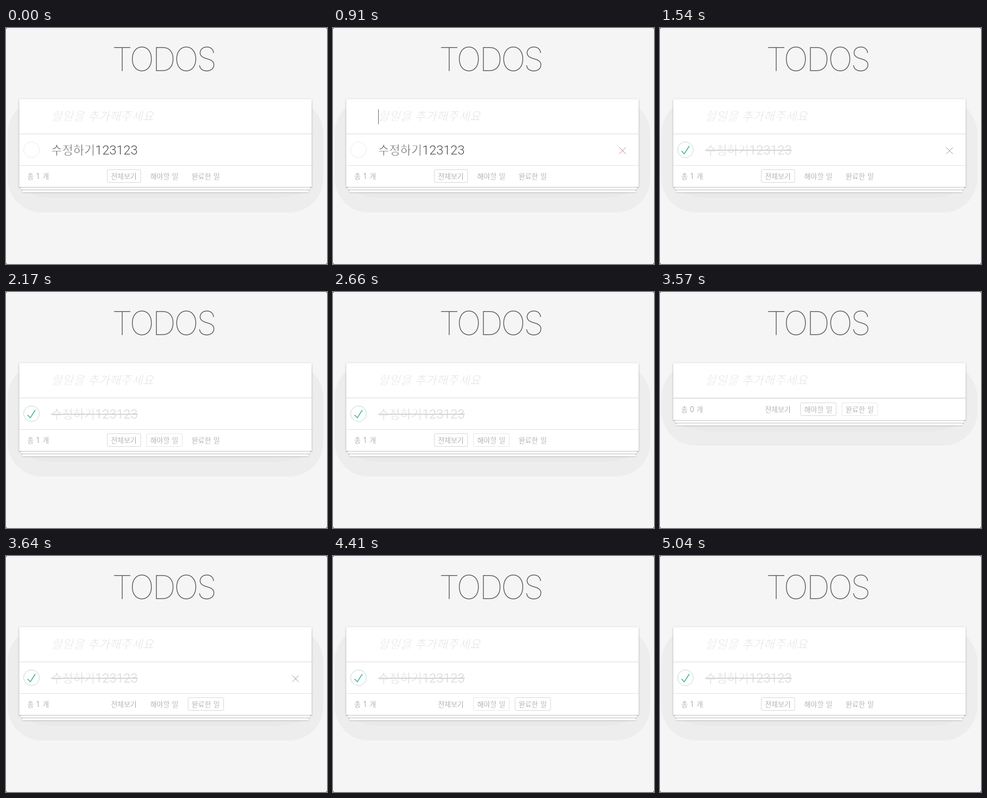
Recreate the animation shown at these times as an HTML page. Size 604 by 444 pixels, loop 6.3 s.

```html
<!DOCTYPE html>
<html lang="ko">
<head>
<meta charset="utf-8">
<title>Todos</title>
<style>
html, body { margin: 0; width: 100%; height: 100%; overflow: hidden; background: #333; }
#stage { position: relative; width: 604px; height: 444px; overflow: hidden; border-radius: 3px; background: #f5f5f5; }
#stage * { position: absolute; }
#card { left: 25px; top: 134px; width: 550px; }
#card div { box-sizing: border-box; }
.glow { inset: 0 -22px -48px; border-radius: 64px; background: #ededed; }
.core { inset: 40px 16px -21px; border-radius: 0 0 60px 60px / 0 0 16px 16px; background: #e9e9e9; }
.paper {
  inset: 0; background: #fff;
  box-shadow: 0 1px 1px rgba(0,0,0,.2),
    0 8px 0 -3px #fcfcfc, 0 9px 1px -3px rgba(0,0,0,.2),
    0 16px 0 -6px #fcfcfc, 0 17px 2px -6px rgba(0,0,0,.2),
    0 1px 4px rgba(0,0,0,.2);
}
.input { left: 0; right: 0; height: 65px; box-shadow: inset 0 -2px 1px rgba(0,0,0,.03); }
svg { left: 0; top: 0; }
/* the white stroke thins the Hangul strokes */
text { font: 300 22.5px "Noto Sans CJK KR", "Noto Sans CJK", sans-serif; white-space: pre; stroke: #fff; stroke-width: .8px; }
.num { font-family: Roboto, sans-serif; font-size: 24px; stroke: none; }
#title { font: 100 62px Inter, sans-serif; letter-spacing: -3.5px; fill: #555; stroke: none; }
#hint { font-style: italic; fill: #dedede; }
#foot text { font-size: 13.16px; word-spacing: .8px; fill: #8a8a8a; stroke-width: .35px; }
#foot .num { font-size: 14px; }
#foot rect { fill: none; }
.line { stroke: #e3e3e3; }
</style>
</head>
<body>
<div id="stage">
  <div id="card">
    <div class="glow"></div><div class="core"></div>
    <div class="paper"></div><div class="input"></div>
  </div>
  <svg width="604" height="444" fill="none">
    <text id="title" x="199.6" y="80.7">TODOS</text>
    <text id="hint" x="85" y="174">할일을 추가해주세요</text>
    <path id="caret" d="M85.5 153v28" stroke="#666"/>
    <path class="line" d="M25 199.5h550"/>
    <g id="item">
      <circle id="ring" cx="48" cy="229" r="14.8"/>
      <path id="tick" fill="#52b8a4" transform="translate(33.2 214.2) scale(.296)" d="M72 25L42 71 27 56l-4 4 20 20 34-52z"/>
      <text id="label" x="85" y="238">수정하기<tspan class="num">123123</tspan></text>
      <path id="strike" d="M85 230h163" stroke="#d4d4d4" stroke-width="2"/>
      <path id="cross" d="M538.5 224.5l12.5 12.5m0-12.5l-12.5 12.5" stroke="#b98585"/>
    </g>
    <g id="foot">
      <path class="line" d="M25 258.5h550"/>
      <text x="40" y="284">총 <tspan class="num" id="count">1</tspan> 개</text>
    </g>
  </svg>
</div>
<script>
const $ = id => document.getElementById(id);
const show = (id, on) => $(id).style.display = on ? '' : 'none';
const LOOP = 6300;

function add(tag, attrs, text = '') {
  const el = document.createElementNS('http://www.w3.org/2000/svg', tag);
  for (const k in attrs) el.setAttribute(k, attrs[k]);
  el.textContent = text;
  return $('foot').appendChild(el);
}

const tabs = [['전체보기', 190, 63], ['해야할 일', 264, 67], ['완료한 일', 342, 67]].map(([name, x, width]) => {
  add('text', { x: x + 7.5, y: 284 }, name);
  return add('rect', { x: x + .5, y: 266.5, width, height: 24, rx: 2.5 });
});

function draw(t) {
  const within = (a, b) => t >= a && t < b;
  const done = t >= 1540;
  const empty = within(2730, 3640);
  const selected = empty ? 1 : within(3640, 5040) ? 2 : 0;
  const hovered = [t >= 4900, within(2170, 2730) || within(4410, 4480), within(3570, 3640)];

  $('card').style.height = (empty ? 107 : 165) + 'px';
  $('foot').setAttribute('transform', `translate(0 ${empty ? -58 : 0})`);
  $('count').textContent = empty ? 0 : 1;

  show('caret', within(700, 1190));
  show('item', !empty);
  show('tick', done);
  show('strike', done);
  show('cross', within(910, 1820) || within(3640, 4130));
  $('ring').style.stroke = done ? '#bddad5' : '#ebebeb';
  $('label').style.fill = done ? '#d4d4d4' : '#4d4d4d';

  tabs.forEach((box, i) => {
    box.style.stroke = i === selected ? '#dcd6d6' : hovered[i] ? '#e9e6e6' : 'none';
  });
}

function tick(now) {
  draw(now % LOOP);
  requestAnimationFrame(tick);
}
draw(0);
requestAnimationFrame(tick);
</script>
</body>
</html>
```
